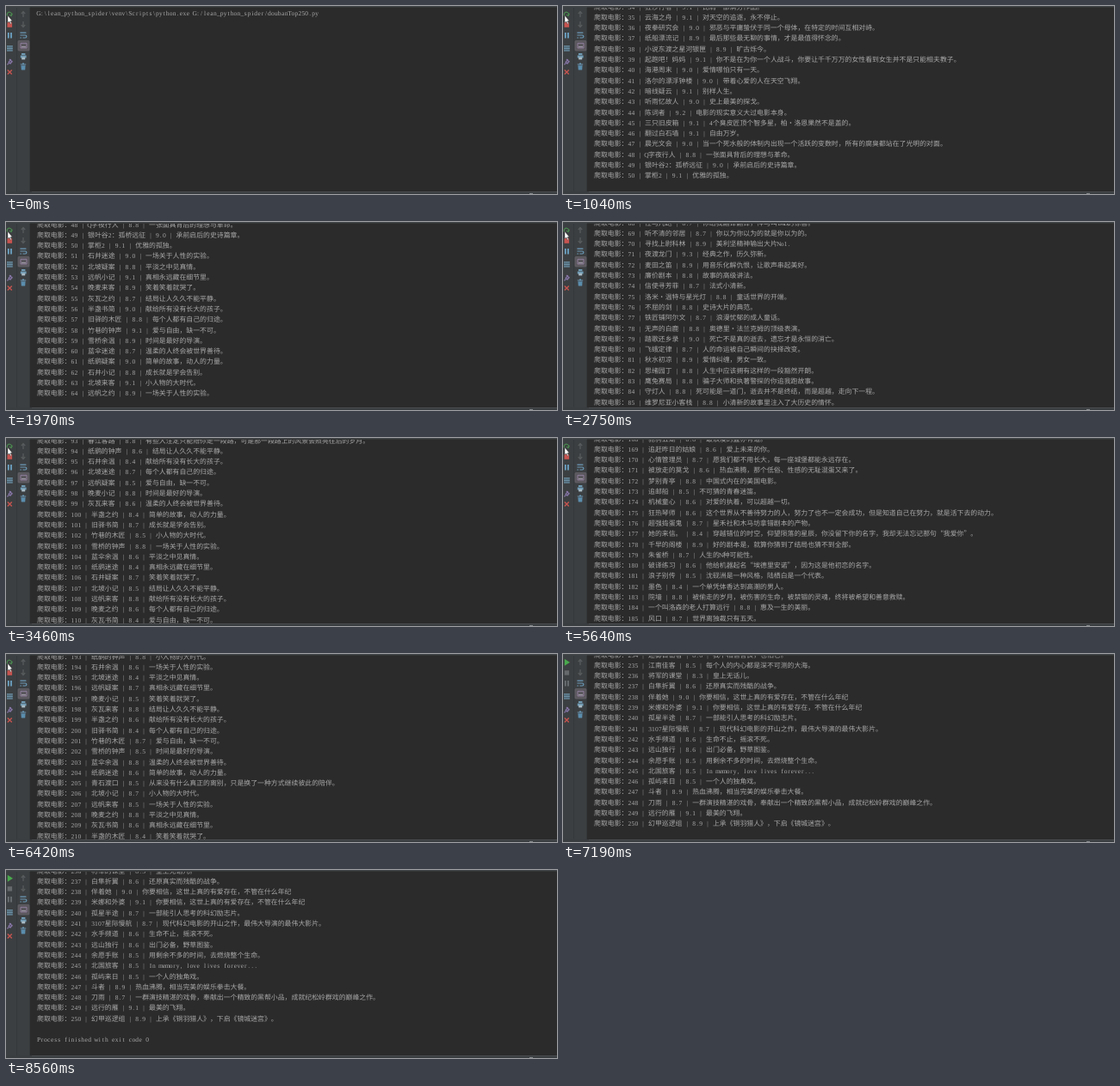
Recreate the animation shown at these times as an HTML page. Size 640 px wide and 219 px high, loop 9020 ms.

```html
<!DOCTYPE html>
<html lang="zh-CN">
<head>
<meta charset="utf-8">
<style>
  html, body { margin: 0; width: 100%; height: 100%; overflow: hidden; background: #2b2b2b; }
  svg { display: block; }
  text { text-rendering: geometricPrecision; text-anchor: middle; fill: #a9a9a9; }
  .half { font: 7.5px "Liberation Serif", serif; }
  .full { font: 300 7.88px "Noto Sans CJK SC", "Noto Sans CJK", sans-serif; }
</style>
</head>
<body>
<svg id="stage" width="640" height="219" viewBox="0 0 640 219">
  <defs>
    <clipPath id="pane"><rect x="28" y="2" width="612" height="214"/></clipPath>
    <path id="pointer" d="M0 0V8.6L1.9 7L3.2 10L4.4 9.4L3.2 6.6H5.4Z" fill="#fff" stroke="#222" stroke-width=".4"/>
  </defs>
  <rect width="640" height="219" fill="#2b2b2b"/>
  <rect width="28" height="219" fill="#3c3f41"/>
  <path d="M12.5 2V216M27.5 2V216" stroke="#35383a"/>
  <rect width="640" height="1.4" fill="#414446"/>
  <rect y="216" width="640" height="3" fill="#3a3d3f"/>
  <path d="M30 216.5H640" stroke="#4a4d4f"/>
  <path d="M608 218.5h4" stroke="#85888a"/>

  <g id="running">
    <path d="M2 11.6A2.6 2.6 0 1 1 6.2 11M7.4 8.8L6.2 11.4L4 10.2" fill="none" stroke="#4a8a50" stroke-width="1.1"/>
    <rect x="1.5" y="19" width="5.6" height="5.8" fill="#c75450"/>
    <path d="M2.8 31v6.4M6 31v6.4" stroke="#6fa8cc" stroke-width="1.7"/>
  </g>
  <g id="stopped">
    <path d="M1.8 5.8L8 9.8L1.8 13.8Z" fill="#49a84e"/>
    <rect x="1.7" y="19.2" width="5.4" height="5.4" fill="#66696b"/>
    <path d="M2.8 31v6.4M6 31v6.4" stroke="#6b7175" stroke-width="1.7"/>
  </g>
  <rect x="1" y="46" width="6.8" height="6.6" fill="#4d6472"/>
  <path d="M1 46.8h6.8M1 49.4h6.8M1 52h6.8" stroke="#6d8fa3" stroke-width="1.1"/>
  <path d="M4 62l3.4 3.4M5.8 62.2l-2.6 3.2l1.8 1.6l2.4-3M3.9 66L1.4 68.4" fill="none" stroke="#8676a8" stroke-width="1.3"/>
  <path d="M1.8 74.6l5 5M6.8 74.6l-5 5" stroke="#c75450" stroke-width="1.4"/>

  <path d="M20 13V6.4M17.8 9L20 6.4L22.2 9M20 18V24.6M17.8 22L20 24.6L22.2 22" fill="none" stroke="#575b5d" stroke-width="1.3"/>
  <path d="M16.4 31.2h7M16.4 34h6a1.5 1.5 0 0 1 0 3h-3M16.4 37h1.6" fill="none" stroke="#6c9ab8" stroke-width="1.2"/>
  <rect x="14" y="40.5" width="13" height="11.5" rx="1" fill="#5a575d" stroke="#6e6b71" stroke-width=".6"/>
  <path d="M17 43.4h7v5.6h-7z" fill="none" stroke="#8f7f9c"/>
  <path d="M18 47.6h5" stroke="#a9a4b0"/>
  <path d="M18 55h4.4v2H18zM16.8 57.4h6.8v3h-6.8z" fill="#6f9ab3"/>
  <path d="M18.2 59.6h4v2.8h-4z" fill="#a9bcc6"/>
  <path d="M16.8 68h6.4M19 67h2" stroke="#6c9ab8" stroke-width="1.1"/>
  <path d="M17.4 69.2h5.2l-.4 5.2h-4.4z" fill="#5b8dad"/>
  <g id="console" clip-path="url(#pane)"></g>
</svg>
<script>
const LOOP = 9020, LEFT = 36, CELL = 3.94, PITCH = 12.3, TOP = 8.2, REST = 197.4;

// Consecutive result rows, keyed by the number of the first one.
const blocks = {
18: `长堤旧事|9.1|他用了整整一生去寻找那个答案，最后才发现答案一直都在家门口等着他。`,
34: `狂沙行者|9.1|比肩一部满分作品。
云海之舟|9.1|对天空的追逐，永不停止。
夜拳研究会|9.0|邪恶与平庸蛰伏于同一个母体，在特定的时间互相对峙。
纸船漂流记|8.9|最后那些最无聊的事情，才是最值得怀念的。
小说东渡之星河银匣|8.9|旷古烁今。
起跑吧！妈妈|9.1|你不是在为你一个人战斗，你要让千千万万的女性看到女生并不是只能相夫教子。
海港周末|9.0|爱情哪怕只有一天。
洛尔的漂浮钟楼|9.0|带着心爱的人在天空飞翔。
暗线疑云|9.1|别样人生。
听雨忆故人|9.0|史上最美的探戈。
陈词者|9.2|电影的现实意义大过电影本身。
三只旧皮箱|9.1|4个臭皮匠顶个智多星，柏·洛恩果然不是盖的。
翻过白石墙|9.1|自由万岁。
晨光文会|9.0|当一个死水般的体制内出现一个活跃的变数时，所有的腐臭都站在了光明的对面。
Q字夜行人|8.8|一张面具背后的理想与革命。
银叶谷2：孤桥远征|9.0|承前启后的史诗篇章。
掌柜2|9.1|优雅的孤独。`,
68: `任马儿跑|8.7|你给我翻译翻译，神马叫TMD的惊喜。
听不清的邻居|8.7|你以为你以为的就是你以为的。
寻找上尉科林|8.9|美利坚精神输出大片No1.
夜渡龙门|9.3|经典之作，历久弥新。
麦田之笛|8.9|用音乐化解仇恨，让歌声串起美好。
廉价剧本|8.8|故事的高级讲法。
信使寻芳菲|8.7|法式小清新。
洛米·温特与星光灯|8.8|童话世界的开端。
不屈的剑|8.8|史诗大片的典范。
铁匠铺阿尔文|8.7|浪漫忧郁的成人童话。
无声的白鹿|8.8|奥德里·法兰克姆的顶级表演。
踏歌还乡录|9.0|死亡不是真的逝去，遗忘才是永恒的消亡。
飞蛾定律|8.7|人的命运被自己瞬间的抉择改变。
秋水初凉|8.9|爱情纠缠，男女一致。
思绪园丁|8.8|人生中应该拥有这样的一段豁然开朗。
鹰兔赛局|8.8|骗子大师和执著警探的你追我跑故事。
守灯人|8.8|死可能是一道门，逝去并不是终结，而是超越，走向下一程。
维罗尼亚小客栈|8.8|小清新的故事里注入了大历史的情怀。`,
93: `春江客路|8.8|有些人注定只能陪你走一段路，可是那一段路上的风景会照亮往后的岁月。`,
118: `山月无言|8.7|我们都曾以为自己会是那个例外，直到时间把每个人都打磨成相似的样子。`,
134: `流萤之谷|8.7|碰不到的爱人。
热闹石洞人|8.7|老少皆宜，这就是好莱坞动画的魅力。
南剑北刀|8.6|电影诗。
奇想护卫团|8.6|Balalala~~~
团席|8.8|中国家庭的喜怒哀乐忍。
柳书生追春桃|8.5|秦太师是岑霂，骆闻屿四大才子之一。
棚户区的千金掌柜|8.5|天使之港+追邮船+老贝自传+欢乐问答=山寨富翁
夜枭客：幽影卫士归来|8.6|霍岑就是保证。
往事残页|8.6|一个针管引发的血案。
灰鹭鸶|8.5|黑暗之美。
侠客风骨|8.6|英雄泪短，兄弟情长。
梦回廊|8.7|荒诞讽刺，千奇百巧，抽丝剥茧，百转千回。
雾客|8.7|生活在自己的世界里，也可以让周围的人显得可笑和渺小。
四下无声|9.1|我的平常生活就是他人的幸福。
矜持与误会|8.5|爱是摒弃矜持与误会之后的曙光。
离奇旧闻|8.8|始于荒诞，止于更荒诞。
莫兰达旅店|8.9|当这个世界闭上双眼，他却敞开了怀抱。`,
168: `驰骋五湖|8.8|最浪漫的盗亦有道。
追赶昨日的姑娘|8.6|爱上未来的你。
心情管理员|8.7|愿我们都不用长大，每一座城堡都能永远存在。
被放走的莫戈|8.6|热血沸腾，那个低俗、性感的无耻混蛋又来了。
梦别青亭|8.8|中国式内在的美国电影。
追邮船|8.5|不可猜的青春迷笛。
机械童心|8.6|对爱的执着，可以超越一切。
狂热琴师|8.6|这个世界从不善待努力的人，努力了也不一定会成功，但是知道自己在努力，就是活下去的动力。
超强捣蛋鬼|8.7|星禾社和木马坊拿错剧本的产物。
她的来信。|8.4|穿越错位的时空，仰望陨落的星辰，你没留下你的名字，我却无法忘记那句“我爱你”。
千早的阁楼|8.9|好的剧本是，就算你猜到了结局也猜不到全部。
朱雀桥|8.7|人生的N种可能性。
破译练习|8.6|他给机器起名“埃德里安诺”，因为这是他初恋的名字。
浪子别传|8.5|沈砚洲是一种风格，陆栖白是一个代表。
墨色|8.4|一个单凭体香达到高潮的男人。
院墙|8.8|被偷走的岁月，被伤害的生命，被禁锢的灵魂，终将被希望和善意救赎。
一个叫洛森的老人打算远行|8.8|惠及一生的美丽。
风口|8.7|世界离独裁只有五天。`,
188: `孤灯远巷|8.6|在漫长的黑夜里，每一盏不肯熄灭的灯都是一个人对世界最后的温柔，也是他留给明天的回答。`,
205: `青石渡口|8.5|从来没有什么真正的离别，只是换了一种方式继续彼此的陪伴。`,
234: `迷雾目击者|8.6|我不相信善良，也怕它。
江南佳客|8.5|每个人的内心都是深不可测的大海。
将军的课堂|8.3|皇上无话儿。
白隼折翼|8.6|还原真实而残酷的战争。
伴着她|9.0|你要相信，这世上真的有爱存在，不管在什么年纪
米娜和外婆|9.1|你要相信，这世上真的有爱存在，不管在什么年纪
孤星半途|8.7|一部能引人思考的科幻励志片。
3107星际慢航|8.7|现代科幻电影的开山之作，最伟大导演的最伟大影片。
水手频道|8.6|生命不止，摇滚不死。
远山独行|8.6|出门必备，野草图鉴。
余愿手账|8.5|用剩余不多的时间，去燃烧整个生命。
北国旅客|8.5|In memory, love lives forever...
孤屿来日|8.5|一个人的独角戏。
斗者|8.9|热血沸腾，相当完美的娱乐拳击大餐。
刀雨|8.7|一群演技精湛的戏骨，奉献出一个精致的黑帮小品，成就纪松岭群戏的巅峰之作。
远行的雁|9.1|最美的飞翔。
幻甲巡逻组|8.9|上承《铜羽猎人》，下启《镜城迷宫》。`
};

// Stock phrases for the rows that rush past.
const heads = '灰瓦 北坡 蓝伞 旧驿 晚麦 石井 雪桥 半盏 远帆 纸鹞 竹巷'.split(' ');
const tails = '来客 书简 的钟声 迷途 小记 之约 的木匠 余温 疑案'.split(' ');
const notes = `平淡之中见真情。
每个人都有自己的归途。
成长就是学会告别。
笑着笑着就哭了。
时间是最好的导演。
一场关于人性的实验。
献给所有没有长大的孩子。
简单的故事，动人的力量。
真相永远藏在细节里。
爱与自由，缺一不可。
小人物的大时代。
结局让人久久不能平静。
温柔的人终会被世界善待。`.split('\n');

const rows = {
  0: 'G:\\lean_python_spider\\venv\\Scripts\\python.exe G:/lean_python_spider/doubanTop250.py',
  252: 'Process finished with exit code 0'
};
const format = (n, title, score, note) => `爬取电影：${n} | ${title} | ${score} | ${note}`;

for (const first in blocks)
  blocks[first].split('\n').forEach((line, i) => {
    const n = +first + i;
    rows[n] = format(n, ...line.split('|'));
  });
for (let n = 1; n <= 250; n++)
  rows[n] ??= format(n, heads[n * 7 % 11] + tails[n * 5 % 9],
    (((n < 70 ? 87 : 84) + n * 3 % 5) / 10).toFixed(1), notes[n * 8 % 13]);

// Start time, last row printed, how far it hangs below its resting place.
const steps = [
  [0, 0, TOP - REST], [280, 25], [890, 35, PITCH], [1040, 50], [1970, 64, 2], [2130, 75],
  [2750, 85, PITCH], [2900, 100], [3460, 110, PITCH + 2], [3600, 125], [4260, 150],
  [4940, 160, PITCH + 2], [5090, 175], [5640, 185, PITCH], [5800, 200], [6420, 210, PITCH + 2],
  [6570, 225], [7190, 250], [7340, 252]
];

const stage = document.getElementById('stage');
const pane = document.getElementById('console');

function add(parent, tag, attrs = {}) {
  const el = document.createElementNS('http://www.w3.org/2000/svg', tag);
  for (const key in attrs) el.setAttribute(key, attrs[key]);
  return parent.appendChild(el);
}

// Fixed grid: ASCII takes one cell, everything else two.
function drawLine(parent, line, y) {
  const text = add(parent, 'text', { y: (y + 2.9).toFixed(2) });
  let col = 0;
  for (const run of line.match(/ +|[!-~]+|[^ -~]+/g)) {
    const size = run.charCodeAt(0) < 127 ? 1 : 2;
    if (run[0] !== ' ') {
      const xs = [...run].map((_, i) => (LEFT + (col + (i + .5) * size) * CELL).toFixed(2));
      add(text, 'tspan', { class: size === 1 ? 'half' : 'full', x: xs.join(' ') }).textContent = run;
    }
    col += run.length * size;
  }
}

const parts = [];
const during = (el, from, to) => parts.push({ el, from, to });

steps.forEach(([from, last, drop = 0], i) => {
  const page = add(pane, 'g');
  for (let n = last, y = REST + drop; n >= 0 && y > -5; n--, y -= PITCH)
    if (rows[n]) drawLine(page, rows[n], y);
  during(page, from, i + 1 < steps.length ? steps[i + 1][0] : LOOP);
});

during(document.getElementById('running'), 0, 7190);
during(document.getElementById('stopped'), 7190, LOOP);

// Pointer: from, to, x, y.
[[0, 6880, 2, 11], [7960, 8110, 637, 170], [8110, 8260, 634, 202], [8260, 8560, 634, 218]]
  .forEach(([from, to, x, y]) => during(add(stage, 'use', { href: '#pointer', x, y }), from, to));

const start = performance.now();
function tick() {
  const t = (performance.now() - start) % LOOP;
  for (const { el, from, to } of parts)
    el.style.display = t >= from && t < to ? '' : 'none';
  requestAnimationFrame(tick);
}
tick();
</script>
</body>
</html>
```
